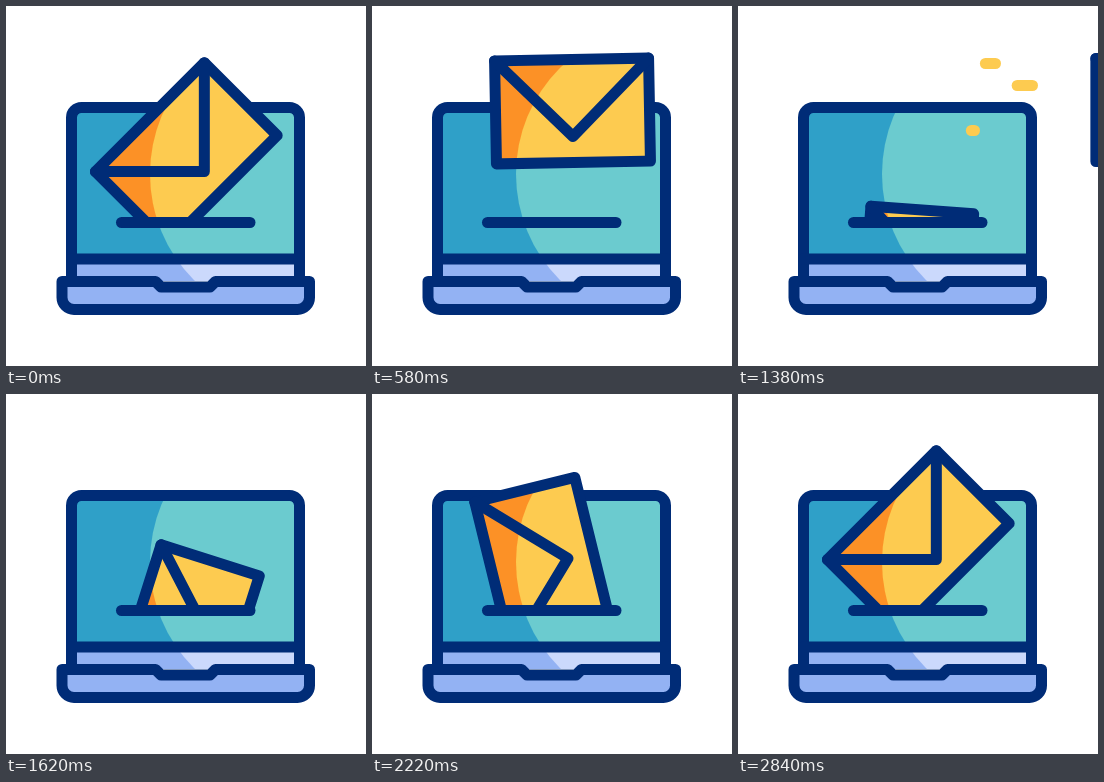
Write an HTML page with a canvas that moves like this. It is 360 px wide and 360 px high and loops after 3000 ms.

```html
<!DOCTYPE html>
<html lang="en">
<head>
<meta charset="utf-8">
<title>Sending mail</title>
<style>
  html, body { margin: 0; width: 100%; height: 100%; overflow: hidden; background: #fff; }
  canvas { display: block; width: 360px; height: 360px; }
</style>
</head>
<body>
<canvas width="360" height="360"></canvas>
<script>
const ctx = document.querySelector('canvas').getContext('2d');
const LOOP = 3000;
const NAVY = '#002c77', YELLOW = '#fdcb50', ORANGE = '#fc9126';
const TEAL = '#6bcbcf', BLUE = '#2fa0c8', PERIWINKLE = '#93b2f3', PALE = '#cbd9fc';
const SLOT_Y = 216.5;

const light = new Path2D();
light.arc(294, 168, 150, 0, 7);
const screen = new Path2D('M65.5 275V111.5a10 10 0 0 1 10-10H283.5a10 10 0 0 1 10 10V275');
const glass = new Path2D('M66 102H293V253H66z');
const hinge = new Path2D('M66 253H293V275H66z');
const hingeLine = new Path2D('M65.5 253H293.5');
const base = new Path2D('M56 275.5H149.5L155 281H204L209.5 275.5H303.5V291.5a12 12 0 0 1-12 12H68a12 12 0 0 1-12-12z');
const slot = new Path2D(`M115.5 ${SLOT_Y}H244`);
const paper = new Path2D('M-77-51.5H77V51.5H-77z');
const flap = new Path2D('M-77-51.5L0 25.5L77-51.5');

const progress = (t, a, b) => Math.min(1, Math.max(0, (t - a) / (b - a)));
const ease = p => (1 - Math.cos(Math.PI * p)) / 2;
const mix = (a, b, p) => a + (b - a) * p;

function stroke(path, color = NAVY) {
  ctx.strokeStyle = color;
  ctx.stroke(path);
}

// Fill a shape dark, then lighter inside the fixed round highlight.
function shade(path, dark, bright, matrix = new DOMMatrix()) {
  const shape = new Path2D();
  shape.addPath(path, matrix);
  ctx.fillStyle = dark;
  ctx.fill(shape);
  ctx.save();
  ctx.clip(light);
  ctx.fillStyle = bright;
  ctx.fill(shape);
  ctx.restore();
}

function envelope(x, y, angle) {
  const matrix = new DOMMatrix().translate(x, y).rotate(angle);
  ctx.save();
  ctx.beginPath();
  ctx.rect(0, 0, 360, SLOT_Y);
  ctx.clip();
  shade(paper, ORANGE, YELLOW, matrix);
  ctx.translate(x, y);
  ctx.rotate(angle * Math.PI / 180);
  stroke(paper);
  stroke(flap);
  ctx.restore();
}

function speedLine(t, x, y, start, delay) {
  const travel = 136, duration = 390;
  const head = progress(t, start, start + duration);
  const tail = progress(t, start + delay, start + delay + duration);
  if (head > tail) stroke(new Path2D(`M${x + travel * tail} ${y}H${x + travel * head}`), YELLOW);
}

function outgoing(t) {
  const turn = ease(progress(t, 220, 620));
  const slide = 233.5 * Math.max(0, (t - 620) / 760) ** 1.21;
  envelope(mix(180.3, 201, turn) + slide, mix(147.5, 104, turn), mix(-45, 0, turn));
}

// Rises from the slot while swaying; each key is [time, x, angle].
const sway = [[1250, 178, -90], [1660, 181, -72], [2160, 171, -105], [2840, 180.3, -45]];

function incoming(t) {
  let i = 0;
  while (i < sway.length - 2 && t > sway[i + 1][0]) i++;
  const [t0, x0, a0] = sway[i], [t1, x1, a1] = sway[i + 1];
  const p = ease(progress(t, t0, t1));
  const y = 147.5 + 133.5 * (Math.max(0, 2840 - t) / 1460) ** 2.05;
  envelope(mix(x0, x1, p), y, mix(a0, a1, p));
}

function draw(t) {
  ctx.clearRect(0, 0, 360, 360);
  ctx.lineWidth = 11;
  ctx.lineCap = ctx.lineJoin = 'round';

  shade(glass, BLUE, TEAL);
  shade(hinge, PERIWINKLE, PALE);
  stroke(screen);
  stroke(hingeLine);
  ctx.fillStyle = PERIWINKLE;
  ctx.fill(base);
  stroke(base);

  speedLine(t, 121.5, 57.5, 880, 140);
  speedLine(t, 158.5, 79.5, 945, 90);
  speedLine(t, 100.5, 124.5, 780, 220);
  if (t < 1450) outgoing(t);
  if (t > 1250) incoming(t);
  stroke(slot);
}

function tick() {
  draw(performance.now() % LOOP);
  requestAnimationFrame(tick);
}
tick();
</script>
</body>
</html>
```
